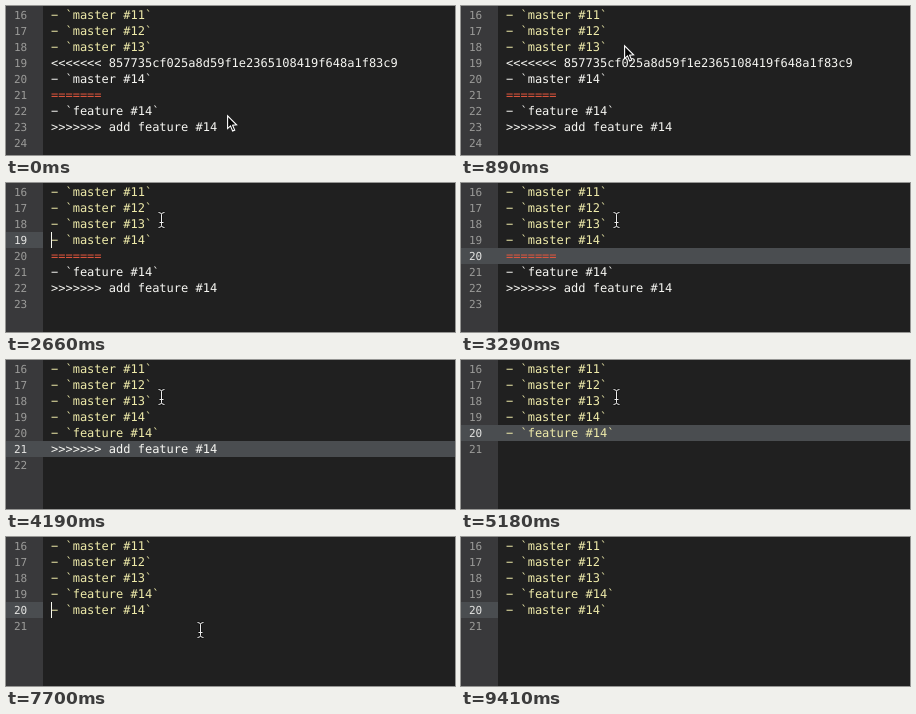
Animation, 449 px wide and 149 px high, one loop 9490 ms. Source, as an HTML page with a canvas:

```html
<!DOCTYPE html>
<html lang="en">
<head>
<meta charset="utf-8">
<title>Resolving a merge conflict</title>
<style>
html, body { margin: 0; width: 449px; height: 149px; overflow: hidden; background: #202020; }
canvas { display: block; }
</style>
</head>
<body>
<canvas id="stage" width="449" height="149"></canvas>
<script>
const LOOP = 9490, W = 449, H = 149, ROW = 16, TOP = 1, TEXT_X = 45, GUTTER = 37;
const FIRST = 16;
const FONT = '"DejaVu Sans Mono", monospace';
const YELLOW = '#efebaa', WHITE = '#f6f6f2', RED = '#e5573d';
const BG = '#202020', GUTTER_BG = '#39393b', ACTIVE = '#4a4d50';
const ctx = document.getElementById('stage').getContext('2d');
ctx.textRendering = 'geometricPrecision';

const item = (name, color = YELLOW) => ['\u2212 `' + name + '`', color];
const start = [item('master #11'), item('master #12'), item('master #13')];
const ours = ['<<<<<<< 857735cf025a8d59f1e2365108419f648a1f83c9', WHITE];
const split = ['=======', RED];
const theirs = ['>>>>>>> add feature #14', WHITE];
const blank = ['', WHITE];
const master = item('master #14'), feature = item('feature #14');
const rawMaster = item('master #14', WHITE), rawFeature = item('feature #14', WHITE);

// Document contents after each edit
const edits = [
  [0, [ours, rawMaster, split, rawFeature, theirs, blank]],
  [2660, [master, split, rawFeature, theirs, blank]],
  [3650, [master, feature, theirs, blank]],
  [4640, [master, feature, blank]],
  [5720, [master, blank]],
  [6530, [feature, master, blank]]
];

// time, active line, mode
const carets = [
  [0, 0, ''], [1410, 18, 'end'], [1680, 19, 'caret'], [2030, 19, 'select'],
  [2660, 19, 'caret'], [3020, 20, 'caret'], [3290, 20, 'select'],
  [3650, 20, 'caret'], [3920, 21, 'caret'], [4190, 21, 'select'],
  [4640, 21, 'caret'], [5180, 20, 'select'], [5720, 20, 'caret'],
  [6080, 19, 'caret'], [6530, 20, 'caret'], [7070, 20, ''],
  [7610, 20, 'caret'], [8240, 20, ''], [8780, 20, 'caret'], [9410, 20, '']
];

// time, pointer shape, x, y
const pointer = [
  [0, arrow, 221, 109], [360, arrow, 218, 104], [450, arrow, 207, 89],
  [540, arrow, 189, 67], [620, arrow, 171, 48], [710, arrow, 160, 37],
  [800, arrow, 157, 35], [890, arrow, 163, 39],
  [1150, beam, 161, 32], [1240, beam, 157, 25], [1320, beam, 155, 27], [1410, beam, 155, 28],
  [7340, beam, 161, 36], [7430, beam, 178, 57], [7520, beam, 196, 77],
  [7610, beam, 201, 83], [7700, beam, 194, 84],
  [8420, beam, 222, 95], [8510, beam, 298, 119], [8600, beam, 378, 138],
  [8780, null, 0, 0]
];

const at = (list, t) => list.findLast(entry => entry[0] <= t);

function arrow(x, y) {
  ctx.save();
  ctx.translate(x, y);
  ctx.beginPath();
  [[.6, .8], [.6, 13.6], [3.5, 10.9], [5.6, 16], [7.7, 15.1], [5.6, 10.2], [9.6, 9.9]]
    .forEach(p => ctx.lineTo(...p));
  ctx.closePath();
  ctx.fillStyle = '#080808';
  ctx.fill();
  ctx.strokeStyle = '#fff';
  ctx.lineWidth = 1.1;
  ctx.stroke();
  ctx.restore();
}

function beam(x, y) {
  ctx.save();
  ctx.translate(x + .5, y + 1);
  ctx.beginPath();
  ctx.moveTo(-3, .5);
  ctx.quadraticCurveTo(0, .5, 0, 2.5);
  ctx.quadraticCurveTo(0, .5, 3, .5);
  ctx.moveTo(0, 2.5);
  ctx.lineTo(0, 13.5);
  ctx.moveTo(-2, 10.5);
  ctx.lineTo(2, 10.5);
  ctx.moveTo(-3, 15.5);
  ctx.quadraticCurveTo(0, 15.5, 0, 13.5);
  ctx.quadraticCurveTo(0, 15.5, 3, 15.5);
  ctx.strokeStyle = '#111';
  ctx.lineWidth = 2.4;
  ctx.stroke();
  ctx.strokeStyle = '#eee';
  ctx.lineWidth = 1;
  ctx.stroke();
  ctx.restore();
}

function box(color, x, y, w, h) {
  ctx.fillStyle = color;
  ctx.fillRect(x, y, w, h);
}

function label(text, color, size, x, y) {
  ctx.font = size + 'px ' + FONT;
  ctx.fillStyle = color;
  ctx.fillText(text, x, y);
}

function draw(t) {
  const lines = [...start, ...at(edits, t)[1]];
  const [, active, mode] = at(carets, t);
  const y = TOP + (active - FIRST) * ROW;

  box(BG, 0, 0, W, H);
  box(GUTTER_BG, 0, 0, GUTTER, H);
  if (active) box(ACTIVE, 0, y, mode === 'select' ? W : GUTTER, ROW);

  lines.forEach(([text, color], i) => {
    const base = TOP + i * ROW + 12, number = FIRST + i;
    label(number, number === active ? '#e4e4e2' : '#9b9b99', 11, 8, base);
    label(text, color, 12, TEXT_X, base);
  });

  if (mode === 'caret') box('#f8f8f0', TEXT_X, y, 1, ROW);
  if (mode === 'end') box('#f8f8f0', TEXT_X + 101, y, 1, ROW);

  const [, shape, px, py] = at(pointer, t);
  if (shape) shape(px, py);
}

const begin = performance.now();
function tick() {
  draw((performance.now() - begin) % LOOP);
  requestAnimationFrame(tick);
}
tick();
</script>
</body>
</html>
```
